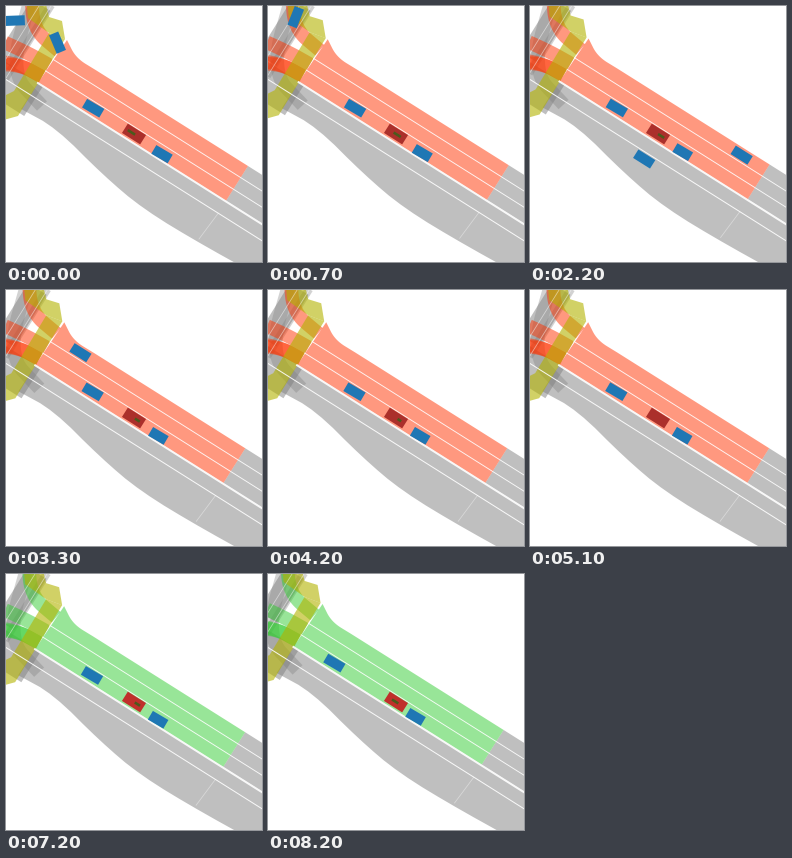
Recreate the animation shown at these times as a matplotlib script. Size 256 px wide and 256 px high, loop 8300 ms.

```python
import numpy as np
import matplotlib.pyplot as plt
from matplotlib.animation import FuncAnimation
from matplotlib.patches import PathPatch, Polygon
from matplotlib.path import Path
from matplotlib.transforms import Affine2D

SIZE, FRAMES, STEP = 256, 83, 100
PX = 0.72  # points per pixel
LANE = 13.7
SALMON_END, STOP = 3 * LANE, 222
ALONG = np.array([0.846, 0.533])
ACROSS = np.array([-0.533, 0.846])
CORNER = np.array([242, 160])
HEADING = np.arctan2(ALONG[1], ALONG[0])
EGO = np.array([128, 128])

RED, GREEN = "#ff3300", "#33cc33"
GRAY, YELLOW = "#808080", "#b3b300"
BLUE = "#1f77b4"
GREEN_TIME, START_TIME, LAUNCH = 7.2, 7.4, 0.8

fig = plt.figure(figsize=(2.56, 2.56), dpi=100, facecolor="white")
ax = fig.add_axes([0, 0, 1, 1])
ax.set_xlim(0, SIZE)
ax.set_ylim(SIZE, 0)
ax.axis("off")

shift = Affine2D()
world = shift + ax.transData
signals = []


def road(back, side):
    """Point on the main road, measured back and sideways from its corner."""
    return CORNER - back * ALONG + side * ACROSS


def smooth(points, rounds=4):
    """Round off the corners of a polyline."""
    pts = np.array(points, float)
    for _ in range(rounds):
        a, b = pts[:-1], pts[1:]
        cut = np.stack([0.75 * a + 0.25 * b, 0.25 * a + 0.75 * b], 1)
        pts = np.vstack([pts[:1], cut.reshape(-1, 2), pts[-1:]])
    return pts


def area(points, color, alpha=0.5, signal=False):
    patch = Polygon(points, fc=color, ec="none", alpha=alpha, transform=world)
    ax.add_patch(patch)
    if signal:
        signals.append(patch.set_facecolor)


def strip(back0, back1, side0, side1, color):
    area([road(back0, side0), road(back1, side0), road(back1, side1),
          road(back0, side1)], color)


def band(points, color, width=LANE, alpha=0.5, signal=False):
    patch = PathPatch(Path(smooth(points)), fc="none", ec=color, lw=width * PX,
                      alpha=alpha, capstyle="butt", transform=world)
    ax.add_patch(patch)
    if signal:
        signals.append(patch.set_edgecolor)


def mark(start, end, width=0.9, alpha=0.9):
    ax.plot(*np.array([start, end]).T, color="white", lw=width * PX,
            alpha=alpha, transform=world)


def draw_map():
    # crossing street
    band([(42, -12), (-18, 84)], GRAY, 22)
    band([(52, -12), (-8, 84)], GRAY, 8, 0.35)
    band([(26, -12), (4, 66), (36, 100)], GRAY, LANE, 0.35)
    strip(216, 270, SALMON_END, 77, GRAY)

    # main road without a signal
    strip(0, -60, 0, SALMON_END, GRAY)
    edge = smooth([(15, 103), (50, 122), (97, 169), (137, 203), (200, 241),
                   (290, 290)], 2)
    area([*edge, road(-90, SALMON_END), road(STOP, SALMON_END)], GRAY)

    # signalled lanes and the turns behind them
    flare = smooth([road(180, 0), (70, 52), (61, 34)])
    area([road(0, 0), *flare, road(STOP, SALMON_END), road(0, SALMON_END)],
         RED, signal=True)
    band([(53, 45), (28, 24), (25, -12)], RED, signal=True)
    band([road(STOP, 1.5 * LANE), (20, 46), (-16, 30)], RED, signal=True)
    for end in (54, 58):
        band([road(STOP, 2.5 * LANE), (15, 59), (-16, end)], RED, signal=True)

    # crosswalks
    area([(43, 27), (59, 33), (12, 110), (-6, 115), (-6, 92), (8, 85)],
         YELLOW, 0.6)
    area([(20, -10), (38, -10), (43, 11), (56, 15), (59, 33), (43, 27),
          (22, 12)], YELLOW, 0.6)

    # lane markings
    for lane in (1, 2):
        mark(road(-60, lane * LANE), road(STOP, lane * LANE))
    mark(road(-60, 41.8), road(STOP, 41.8), 2)
    mark(road(-60, 55.8), road(255, 55.8), 1)
    mark(road(0, 55.8), (193, 233), 0.8, 0.4)
    for x in (38, 50):
        mark((x, -8), (x - 60, 88), 0.8, 0.5)


def box(center, angle, length, width):
    c, s = np.cos(angle), np.sin(angle)
    corners = np.array([(-1, -1), (1, -1), (1, 1), (-1, 1)])
    corners = corners * (length / 2, width / 2)
    return corners @ np.array([(c, s), (-s, c)]) + center


def add_car(color=BLUE):
    patch = Polygon(np.zeros((4, 2)), fc=color, ec="none", zorder=4)
    return ax.add_patch(patch)


class Car:
    """A vehicle following a path; it is at `place` at the given time."""

    def __init__(self, points, time, place, speed, accel=0):
        pts = smooth(points)
        dist = np.r_[0, np.cumsum(np.hypot(*np.diff(pts, axis=0).T))]
        self.dist = np.arange(0, dist[-1], 0.5)
        self.pts = np.array([np.interp(self.dist, dist, p) for p in pts.T]).T
        self.base = self.dist[np.argmin(np.hypot(*(self.pts - place).T))]
        self.time, self.speed, self.accel = time, speed, accel
        self.patch = add_car()

    def at(self, d):
        return np.array([np.interp(d, self.dist, p) for p in self.pts.T])

    def move(self, t):
        dt = t - self.time
        d = self.base + self.speed * dt + self.accel * dt ** 2 / 2
        self.patch.set_visible(0 <= d <= self.dist[-1])
        dx, dy = self.at(d + 3) - self.at(d - 3)
        self.patch.set_xy(box(self.at(d), np.arctan2(dy, dx), 20, 10))


draw_map()
right_turn = [road(-60, 7), road(185, 7), road(210, 7), (46, 27), (40, -40)]
left_turn = [(44, -30), (6, 66), (46, 110), (80, 131.5), (300, 270)]
side_exit = [(44, -20), (28, 20.5), (-60, 4)]
cars = [
    Car(side_exit, 0, (9, 17), 110),
    Car(right_turn, 0, (51, 37), 130),
    Car(left_turn, 2.2, (114, 153), 165, 50),
    Car(right_turn, 2.2, (211, 150), 165, -32),
]
front, rear, ego = add_car(), add_car(), add_car()
ego.set_xy(box(EGO, HEADING, 21.5, 11))
plan, = ax.plot([], [], color="#4c5a1c", lw=2.6 * PX, zorder=5)
spark, = ax.plot([124, 126.5], [125, 127], color="white", lw=1.2 * PX, zorder=5)


def update(i):
    t = i * STEP / 1000
    settle = 1 - np.exp(-t / 1.2)
    launch = max(0, (t - START_TIME) / LAUNCH) ** 2
    shift.clear().translate(*(-(3.4 * settle + 4.2 * launch) * ALONG))

    lit = t >= GREEN_TIME
    for paint in signals:
        paint(GREEN if lit else RED)
    ego.set_facecolor("#c0302b" if lit else "#ab302b")

    front_pos = (87.2, 102.2) - (0.2 * t + 23 * launch) * ALONG
    rear_pos = (156, 148.2) - (4.6 * settle + 5.4 * launch) * ALONG
    front.set_xy(box(front_pos, HEADING - 0.03, 20, 10))
    rear.set_xy(box(rear_pos, HEADING - 0.03, 19 - settle, 10))
    for car in cars:
        car.move(t)

    # planned motion shown on the red car, fading out mid-loop
    half = 3 * abs(np.cos(np.pi * t / 10.2)) * ALONG
    mid = EGO + (4 - 7 * np.exp(-t / 0.7) - 5 * launch) * ALONG
    plan.set_data(*np.array([mid - half, mid + half]).T)
    plan.set_visible(half[0] > 0.3)
    spark.set_visible(6.1 <= t <= 6.8)
    return []


anim = FuncAnimation(fig, update, frames=FRAMES, interval=STEP, repeat=True,
                     repeat_delay=0, blit=False)
plt.show()
```
